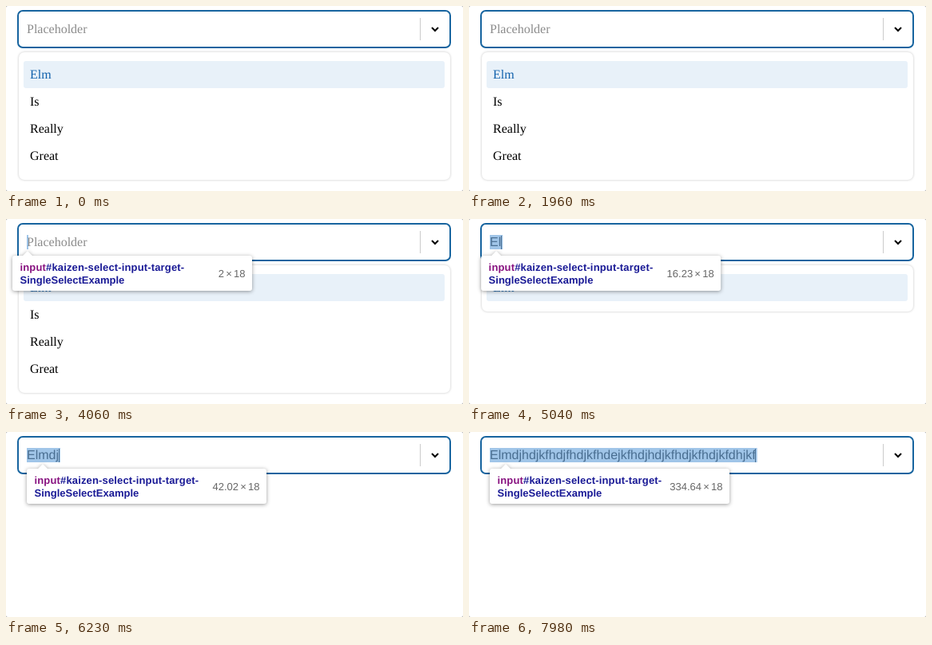
Write an HTML page that moves like this. It is 572x232 px and loops after 8000 ms.

```html
<!DOCTYPE html>
<html lang="en">
<head>
<meta charset="utf-8">
<title>Select input</title>
<style>
  html, body { margin: 0; width: 100%; height: 100%; overflow: hidden; background: #999; }
  svg { display: block; width: 572px; height: 232px; background: #fff; border-radius: 2px; }
  text { white-space: pre; text-rendering: geometricPrecision; }
  .serif { font: 16px "Liberation Serif", "Times New Roman", serif; }
  .sans { font: 16px "Liberation Sans", Arial, sans-serif; }
  .tip { font: 13px "Liberation Sans", Arial, sans-serif; }
  .bold { font-weight: bold; fill: #1a1a96; }
  #panel { fill: #fff; filter: drop-shadow(0 0 1.5px rgba(0,0,0,.24)); }
  #bubble { fill: #fff; filter: drop-shadow(0 1px 2.5px rgba(0,0,0,.4)); }
</style>
</head>
<body>
<svg viewBox="0 0 572 232">
  <rect x="15" y="6" width="541" height="46" rx="6" fill="#fff" stroke="#17649f" stroke-width="2"/>
  <path d="M518.5 15V43" stroke="#ccc"/>
  <path d="M533 27l4 4 4-4" fill="none" stroke="#000" stroke-width="2"/>
  <text id="placeholder" class="serif" x="26" y="34" fill="#8b8b8b">Placeholder</text>
  <text id="typed" class="sans" x="26" y="34"></text>
  <rect id="caret" y="21" width="1" height="17"/>

  <g id="menu">
    <rect id="panel" x="16" y="58" width="540" rx="7"/>
    <rect x="22" y="69" width="527" height="34" rx="3" fill="#e8f1f9"/>
    <g id="items" class="serif"></g>
  </g>

  <g id="inspector">
    <rect id="shade" x="26" y="20" height="18" fill="rgba(111,168,220,.66)"/>
    <g id="tip" class="tip">
      <path id="bubble"/>
      <text class="bold" x="9.5" y="65" letter-spacing=".15"><tspan fill="#881280">input</tspan>#kaizen-select-input-target-</text>
      <text class="bold" x="9.5" y="81">SingleSelectExample</text>
      <text id="size" x="291.5" y="73" text-anchor="end" fill="#666" word-spacing="-1.4"></text>
    </g>
  </g>
</svg>
<script>
const LOOP = 8000;
const TEXT = 'Elmdjhdjkfhdjfhdjkfhdejkfhdjhdjkfhdjkfhdjkfdhjkf';
const OPTIONS = ['Elm', 'Is', 'Really', 'Great'];

// [time, number of typed characters]
const KEYS = [
  [4480, 1], [4900, 2], [5320, 3], [6090, 4], [6230, 5], [6440, 6], [6580, 8],
  [6720, 11], [6790, 13], [6860, 16], [6930, 19], [7000, 21], [7070, 24],
  [7140, 26], [7210, 28], [7280, 30], [7420, 32], [7490, 35], [7560, 37],
  [7630, 40], [7700, 43], [7840, 44], [7910, 46], [7980, 48]
];
const CARET_ON = [[1400, 1960], [2520, 3010], [3570, 4060], [4480, 5950], [6090, LOOP]];
const INSPECT_ON = [[2520, 2800], [3010, LOOP]];

// Glyph advances in 1/2048 em
const ADVANCE = { E: 1366, l: 455, m: 1706, d: 1139, j: 455, h: 1139, k: 1024, f: 569, e: 1139 };

const $ = id => document.getElementById(id);
const set = (id, attrs) => { for (const k in attrs) $(id).setAttribute(k, attrs[k]); };
const show = (id, on) => set(id, { visibility: on ? 'visible' : 'hidden' });
const within = (t, spans) => spans.some(([a, b]) => t >= a && t < b);

function textWidth(s) {
  const px = [...s].reduce((sum, c) => sum + ADVANCE[c], 0) * 16 / 2048;
  return Math.ceil(px * 64) / 64;
}

function drawMenu(query) {
  const found = OPTIONS.filter(o => o.toLowerCase().includes(query.toLowerCase()));
  show('menu', found.length);
  set('panel', { height: 24 + 34 * found.length });
  $('items').innerHTML = found.map((o, i) =>
    `<text x="30" y="${91 + 34 * i}" fill="${i ? '#000' : '#1061ac'}">${o}</text>`).join('');
}

function drawInspector(width) {
  const center = Math.min(26 + width / 2, 46);
  const left = Math.min(26, center - 19);
  const a = center - left;
  set('shade', { width });
  set('tip', { transform: `translate(${left} 0)` });
  set('bubble', { d: `M3 46H${a - 6}L${a} 40L${a + 6} 46H297q3 0 3 3V87q0 3-3 3H3q-3 0-3-3V49q0-3 3-3z` });
  $('size').textContent = `${+width.toFixed(2)} × 18`;
}

let shown = null;
function render(t) {
  const count = KEYS.reduce((n, [at, c]) => t >= at ? c : n, 0);
  const value = TEXT.slice(0, count);
  if (value !== shown) {
    shown = value;
    const width = textWidth(value);
    $('typed').textContent = value;
    show('placeholder', !value);
    set('caret', { x: Math.floor(26 + width) });
    drawMenu(value);
    drawInspector(width + 2);
  }
  show('caret', within(t, CARET_ON));
  show('inspector', within(t, INSPECT_ON));
}

const start = performance.now();
function tick() {
  render((performance.now() - start) % LOOP);
  requestAnimationFrame(tick);
}
tick();
</script>
</body>
</html>
```
